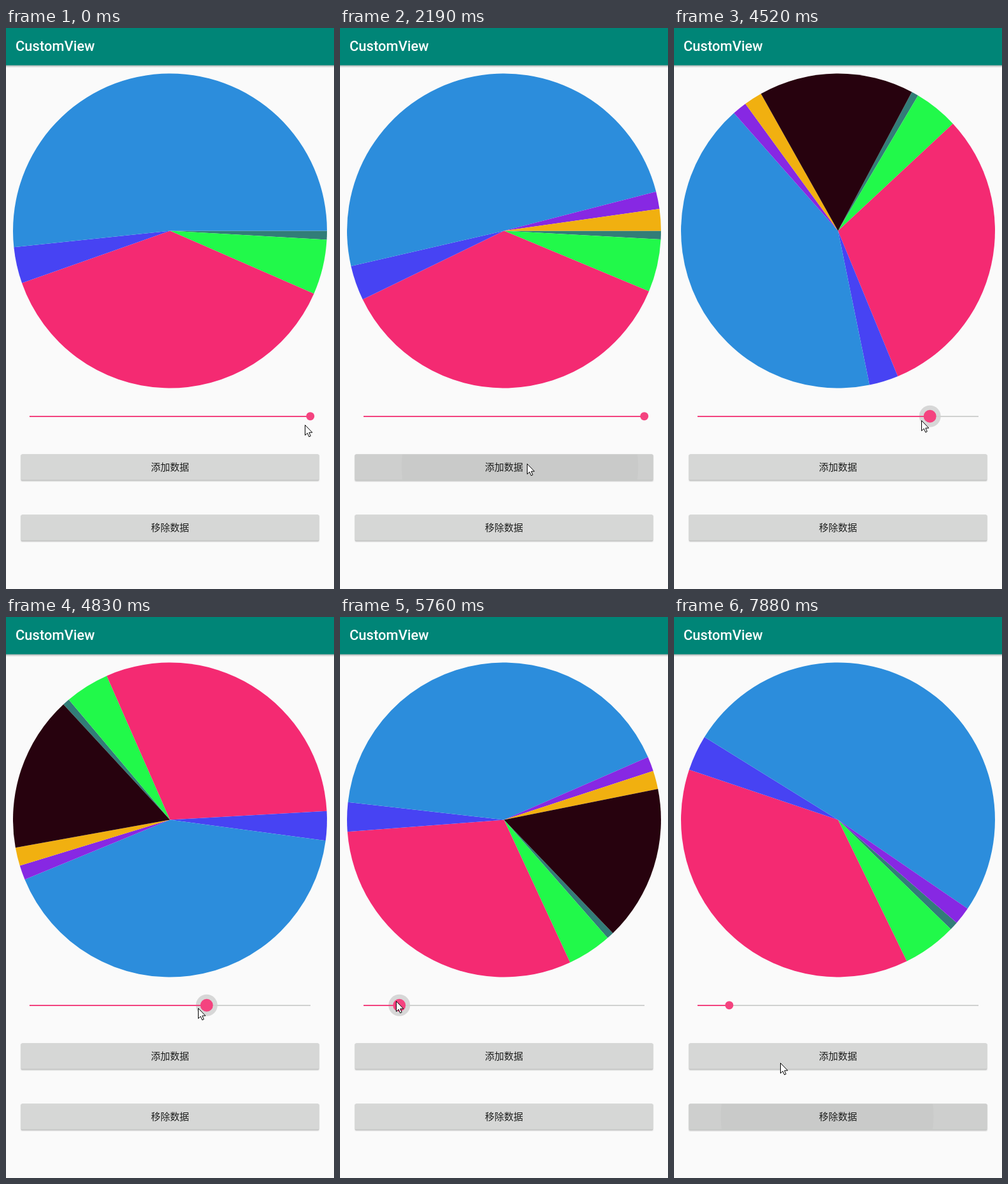
These frames come from a looping animation (516 by 881 pixels, 8000 ms). An HTML page:

```html
<!DOCTYPE html>
<html lang="zh">
<head>
<meta charset="utf-8">
<title>CustomView</title>
<style>
  html, body { margin: 0; width: 100%; height: 100%; overflow: hidden; background: #fafafa; }
  svg { display: block; width: 100vw; height: 100vh; }
  .title { font: 500 22px Roboto, sans-serif; fill: #fff; }
  .label { font: 500 15px "Noto Sans CJK SC", "Noto Sans CJK", sans-serif; fill: #1d1e1d; text-anchor: middle; }
</style>
</head>
<body>
<svg viewBox="0 0 516 881">
  <defs>
    <linearGradient id="barShade" x2="0" y2="1">
      <stop offset="0" stop-color="#9fa9a8"/>
      <stop offset=".55" stop-color="#d6d8d8"/>
      <stop offset="1" stop-color="#fafafa"/>
    </linearGradient>
    <clipPath id="clip"><rect x="23.5" y="669.5" width="469" height="40" rx="2"/></clipPath>
  </defs>
  <rect width="516" height="881" fill="#fafafa"/>
  <rect y="58" width="516" height="4.5" fill="url(#barShade)"/>
  <rect width="516" height="58.5" fill="#008577"/>
  <text class="title" x="15" y="36">CustomView</text>
  <g id="pie" transform="translate(258 318.5)"></g>
  <circle id="halo" cy="609.7" r="17" fill="#000" fill-opacity=".14"/>
  <path d="M37 610H479" stroke="#d0d1d0" stroke-width="2"/>
  <path id="track" stroke="#f2437f" stroke-width="2"/>
  <circle id="thumb" cy="609.7" fill="#f4437f"/>
  <g id="buttons"></g>
  <path id="cursor" d="M.5 .5V16.6L4.2 13.2L6.7 18.9L9.2 17.8L6.8 12.2H11.8Z" fill="#fff" stroke="#000"/>
</svg>
<script>
const LOOP = 8000, FRAME = 141, RADIUS = 247;
const TRACK = { min: 36.7, length: 442 };
const GRAB = 4100, RELEASE = 6040;
const $ = id => document.getElementById(id);
const clamp = v => Math.max(0, Math.min(1, v));

// The screen redraws only within these spans, about once per FRAME
const active = [
  [560, 980], [1250, 1500], [1890, 2190], [2620, 3580], [3730, 3850],
  [GRAB, 4670], [4830, 5760], [5910, 6580], [6850, 7340], [7610, 7880]
];

const rest = { x: 470, y: 623, slider: 478.7 };
const moves = [
  { from: 420, to: 980, x: 294, y: 684 },
  { from: 2880, to: 3850, x: 473, y: 613 },
  { from: GRAB, to: 4520, x: 391, y: 616, slider: 404.8 },
  { from: 4520, to: 5220, x: 191, y: 612, slider: 203.6 },
  { from: 5220, to: 5760, x: 88, y: 603, slider: 93.3 },
  { from: 5760, to: 5910, x: 82, slider: 86.9 },
  { from: RELEASE, to: 6580, x: 195, y: 793 },
  { from: 7610, to: 7880, x: 167, y: 700 }
];

// Each press adds or removes the last slice
const presses = [
  { at: 1250, change: 1 }, { at: 1890, change: 1 }, { at: 2620, change: 1 },
  { at: 6850, change: -1 }, { at: 7610, change: -1 }
];
const FIRST_COUNT = 5;
const slices = [
  { size: 3.25, color: '#327d78' },
  { size: 20.3, color: '#21f94a' },
  { size: 137.05, color: '#f42a72' },
  { size: 13.4, color: '#4743f3' },
  { size: 186, color: '#2c8ddc' },
  { size: 6.65, color: '#8728e3' },
  { size: 8.39, color: '#f1b010' },
  { size: 71.2, color: '#27020e' }
];

function redrawTime(t) {
  const span = active.filter(([from]) => from <= t).pop();
  if (!span) return 0;
  const [from, to] = span;
  const step = (to - from) / Math.round((to - from) / FRAME);
  return Math.min(to, from + Math.floor((t - from + 10) / step) * step);
}

function pose(t) {
  const p = { ...rest };
  for (const { from, to, ...goal } of moves) {
    const k = clamp((t - from) / (to - from));
    for (const key in goal) p[key] += (goal[key] - p[key]) * k;
  }
  return p;
}

function set(el, attrs) {
  for (const name in attrs) el.setAttribute(name, attrs[name]);
}

function add(parent, tag, attrs) {
  const el = document.createElementNS('http://www.w3.org/2000/svg', tag);
  set(el, attrs);
  return parent.appendChild(el);
}

function makeButton(text, row, change, touchX) {
  const g = add($('buttons'), 'g', { transform: `translate(0 ${row * 95})` });
  const box = { x: 23.5, y: 669.5, width: 469, height: 40, rx: 2 };
  const glow = add(g, 'rect', { ...box, x: 22.5, width: 471, height: 43.5, rx: 3 });
  add(g, 'rect', { ...box, height: 42, fill: '#c6c7c6' });
  add(g, 'rect', { ...box, fill: '#d6d7d6' });
  const shade = add(g, 'rect', box);
  const ripple = add(g, 'circle', { cx: touchX, cy: 689, 'clip-path': 'url(#clip)' });
  add(g, 'text', { class: 'label', x: 258, y: 695 }).textContent = text;
  return { change, glow, shade, ripple };
}

const buttons = [makeButton('添加数据', 0, 1, 283), makeButton('移除数据', 1, -1, 241)];
for (const s of slices) s.el = add($('pie'), 'path', { fill: s.color });

function drawPie(t, turn) {
  const count = presses.filter(p => t > p.at + 100)
    .reduce((n, p) => n + p.change, FIRST_COUNT);
  const total = slices.slice(0, count).reduce((sum, s) => sum + s.size, 0);
  const point = a => `${RADIUS * Math.cos(a)} ${RADIUS * Math.sin(a)}`;
  let angle = turn * 2 * Math.PI;
  slices.forEach((s, i) => {
    const sweep = s.size / total * 2 * Math.PI;
    const arc = `A${RADIUS} ${RADIUS} 0 ${+(sweep > Math.PI)} 1 `;
    set(s.el, { d: i < count ? `M0 0L${point(angle)}${arc}${point(angle + sweep)}Z` : '' });
    angle += sweep;
  });
}

function drawButton(b, t) {
  const press = presses.filter(p => p.change === b.change && p.at <= t).pop();
  const age = press ? t - press.at : LOOP;
  const glow = clamp((550 - age) / 250);
  set(b.glow, { 'fill-opacity': .04 + .04 * glow });
  set(b.shade, { 'fill-opacity': .037 * glow });
  set(b.ripple, { r: age * .62, 'fill-opacity': .022 * glow });
}

function draw(now) {
  const t = redrawTime(now % LOOP);
  const { x, y, slider } = pose(t);
  const held = t >= GRAB && t < RELEASE;
  drawPie(t, (slider - TRACK.min) / TRACK.length);
  buttons.forEach(b => drawButton(b, t));
  set($('halo'), { cx: slider, visibility: held ? 'visible' : 'hidden' });
  set($('track'), { d: `M37 610H${slider}` });
  set($('thumb'), { cx: slider, r: held ? 10 : 6.5 });
  set($('cursor'), { transform: `translate(${Math.round(x)} ${Math.round(y)})` });
}

const start = performance.now();
function loop() {
  draw(performance.now() - start);
  requestAnimationFrame(loop);
}
loop();
</script>
</body>
</html>
```
